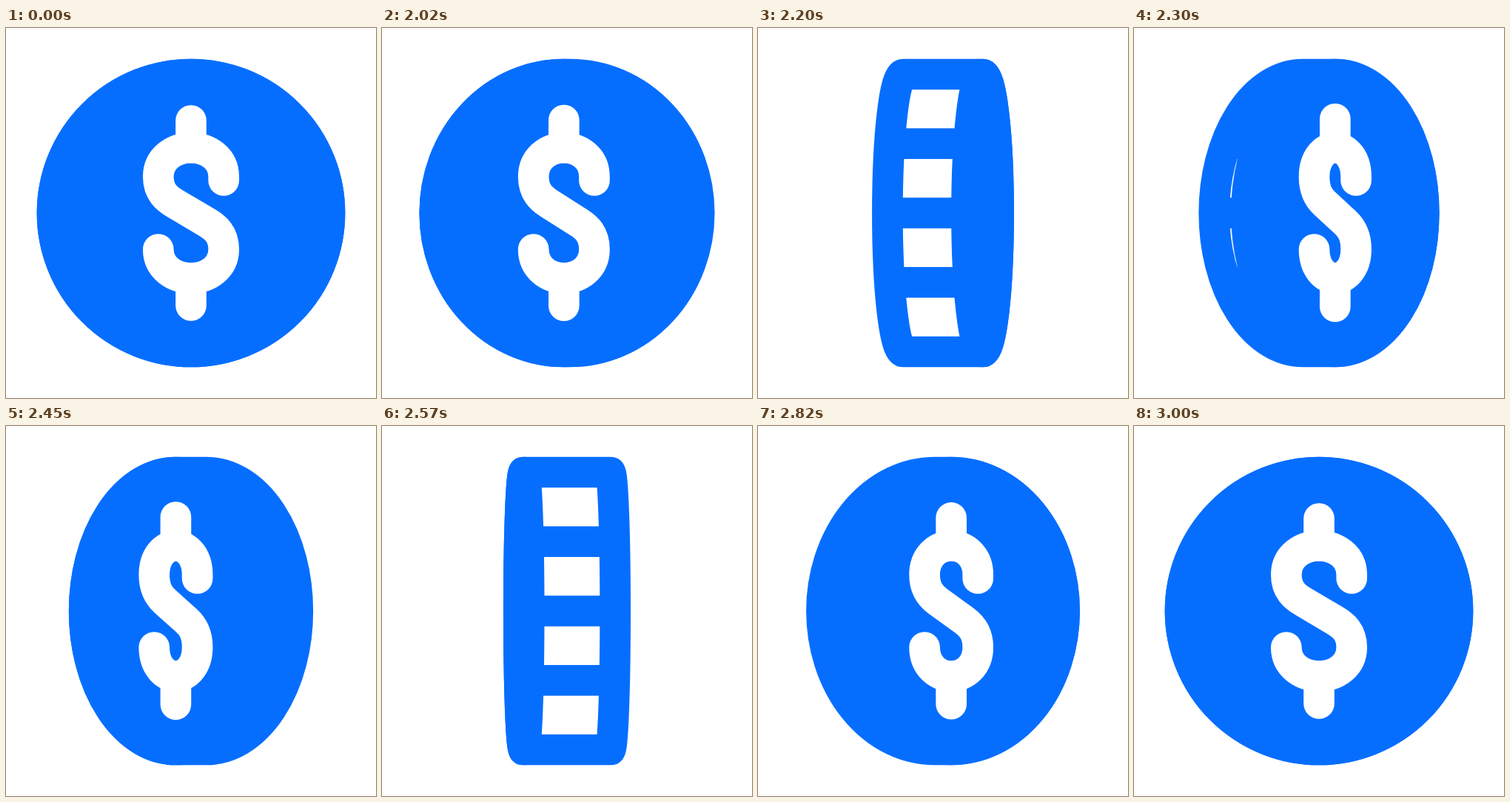
Recreate the animation shown at these times as an HTML page with a canvas. Size 500x500 px, loop 3020 ms.

```html
<!DOCTYPE html>
<html lang="en">
<head>
<meta charset="utf-8">
<title>Spinning coin</title>
<style>
html, body { margin: 0; width: 100%; height: 100%; overflow: hidden; background: #fff; }
canvas { display: block; }
</style>
</head>
<body>
<canvas id="stage" width="500" height="500"></canvas>
<script>
const ctx = document.getElementById('stage').getContext('2d');
const BLUE = '#066eff', WHITE = '#fff';
const LOOP = 3020, SPIN_START = 2000;
const MID = 250, RADIUS = 187.5, HALF_DEPTH = 60.5, LINE = 41.67;

// Curve of the dollar sign, centred on x = 0.
const sign = new Path2D(
  'M44.2 206V201C44.2 177 24 162 0 162C-24 162 -44.2 177 -44.2 201' +
  'C-44.2 222 -32 231 -22 237L22 263C32 269 44.2 278 44.2 299' +
  'C44.2 323 24 338 0 338C-24 338 -44.2 323 -44.2 299');

// Spin in quarter turns: [ms, turns, turns per ms].
const keys = [
  [0, 0, .0022], [25, .069, .0033], [200, 1.115, .0058], [450, 2.34, .0048],
  [575, 2.963, .0046], [700, 3.466, .0035], [1000, 4, 0]
];

function turnsAt(ms) {
  if (ms <= 0) return 0;
  const i = keys.findIndex(key => key[0] >= ms);
  if (i < 0) return 4;
  const [t0, p0, v0] = keys[i - 1], [t1, p1, v1] = keys[i];
  const span = t1 - t0, u = (ms - t0) / span, w = 1 - u;
  return p0 * w * w * (1 + 2 * u) + v0 * span * u * w * w
       + p1 * u * u * (3 - 2 * u) - v1 * span * u * u * w;
}

// The picture steps every 25 ms, on whole hundredths of a second.
function stepTime(ms) {
  return Math.floor(ms / 50) * 50 + (ms % 50 >= 20 ? 25 : 0);
}

function line(x0, y0, x1, y1) {
  ctx.beginPath();
  ctx.moveTo(x0, y0);
  ctx.lineTo(x1, y1);
  ctx.stroke();
}

function drawCoin(turns) {
  const phase = turns % 2;
  const open = Math.abs(1 - phase);
  const depth = HALF_DEPTH * (1 - open);
  const width = RADIUS * open;
  const faceX = MID + (phase < 1 ? -depth : depth);

  ctx.fillStyle = WHITE;
  ctx.fillRect(0, 0, 500, 500);
  ctx.lineWidth = LINE;
  ctx.lineJoin = 'round';
  ctx.strokeStyle = ctx.fillStyle = BLUE;

  // Rim outline with its ridges
  ctx.beginPath();
  ctx.ellipse(MID - depth, MID, width, RADIUS, 0, Math.PI / 2, Math.PI * 1.5);
  ctx.ellipse(MID + depth, MID, width, RADIUS, 0, -Math.PI / 2, Math.PI / 2);
  ctx.closePath();
  ctx.stroke();
  ctx.lineCap = 'butt';
  for (const dy of [-RADIUS / 2, 0, RADIUS / 2]) {
    const reach = depth + open * Math.sqrt(RADIUS ** 2 - dy ** 2);
    line(MID - reach, MID + dy, MID + reach, MID + dy);
  }

  // Visible face
  ctx.beginPath();
  ctx.ellipse(faceX, MID, width, RADIUS, 0, 0, Math.PI * 2);
  ctx.fill();
  ctx.stroke();

  if (open < .3) return;
  const squeezed = new Path2D();
  squeezed.addPath(sign, new DOMMatrix([open, 0, 0, 1, faceX, 0]));
  ctx.strokeStyle = WHITE;
  ctx.lineCap = 'round';
  ctx.stroke(squeezed);
  line(faceX, 125 - 6 * (1 - open), faceX, 162);
  line(faceX, 338, faceX, 375 + 4 * (1 - open));
}

const start = performance.now();
function tick() {
  const ms = (performance.now() - start) % LOOP;
  drawCoin(turnsAt(stepTime(ms) - SPIN_START));
  requestAnimationFrame(tick);
}
tick();
</script>
</body>
</html>
```
